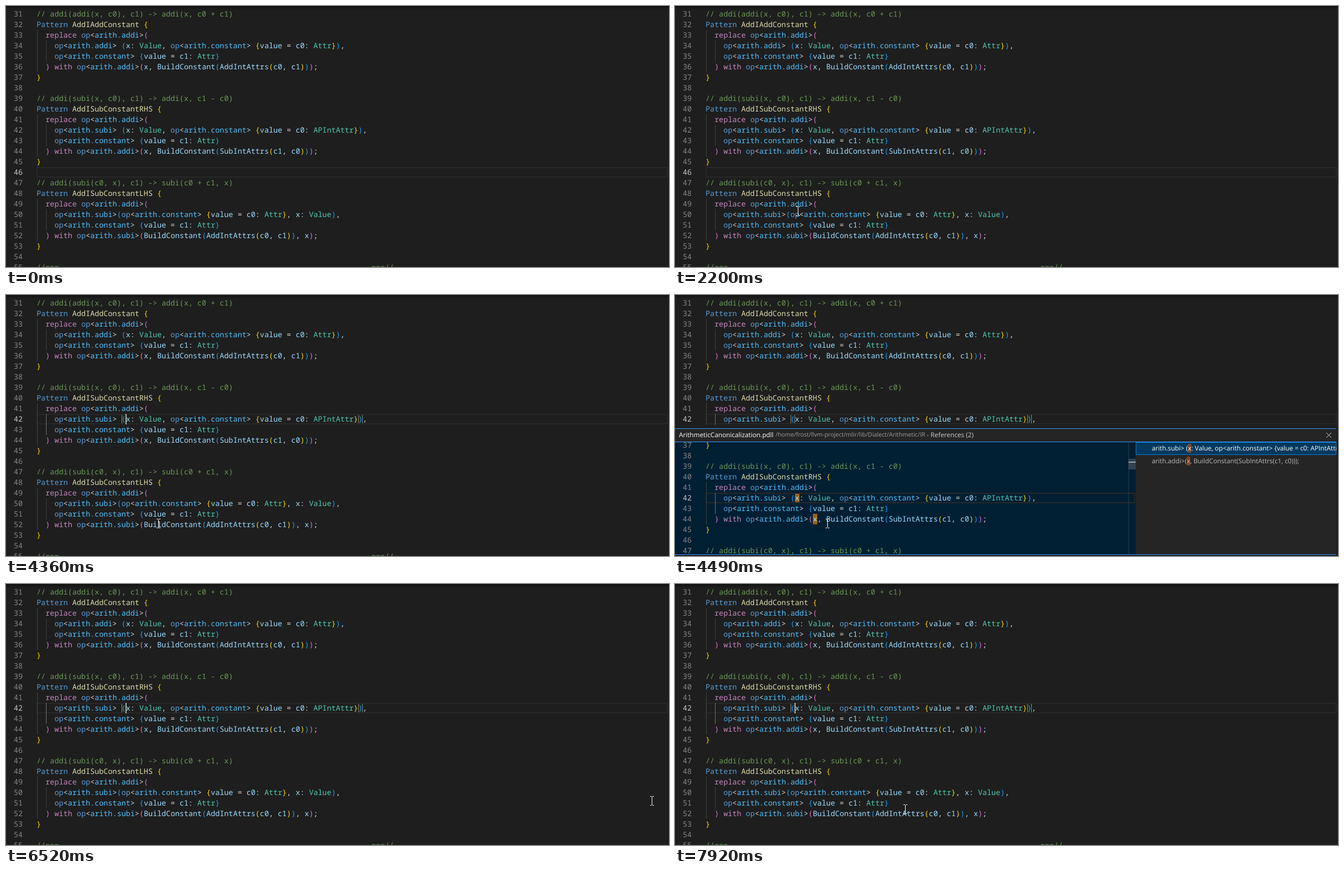
Animation of 1193 by 470 pixels, one loop 8000 ms. Source, as an HTML page:

```html
<!DOCTYPE html>
<html lang="en">
<head>
<meta charset="utf-8">
<title>Peek references</title>
<style>
html, body { margin: 0; width: 100%; height: 100%; overflow: hidden; background: #1e1e1e; }
body { position: relative; font: 11.75px "Open Sans", "Noto Sans", sans-serif; color: #ccc;
  text-rendering: geometricPrecision; white-space: pre; }
div, svg, i, b, u { position: absolute; box-sizing: border-box; }
.view { inset: 0; font: 13.4px/19px "Noto Sans Mono", monospace; font-variant-ligatures: none; color: #d4d4d4; }
.row { left: 0; right: 0; height: 19px; }
.row i { left: 0; width: 30px; text-align: right; font-style: normal; color: #858585; }
.row.on i { color: #c6c6c6; }
.row.on::before { content: ""; position: absolute; left: 55px; right: 2px; top: 0; bottom: 0;
  box-sizing: border-box; border: 2px solid #282828; }
.row u { width: 1px; height: 19px; background: #404040; }
.row u.on { background: #707070; }
.row p { position: absolute; margin: 0; left: 55px; }
.box { width: 8px; height: 19px; border: 1px solid #888; background: rgba(0, 100, 0, .1); }
.mark { width: 8px; height: 19px; background: #ff8f0099; }
#caret { left: 215px; top: 214px; width: 2px; height: 19px; background: #aeafad; }
#shade { left: 0; right: 0; top: 0; height: 6px; box-shadow: #000 0 6px 6px -6px inset; }

#tip { left: 216px; top: 152px; width: 106px; height: 62px; background: #252526; border: 1px solid #454545; line-height: 30px; }
#tip div { left: 8px; }
#tip b { position: static; }
#tip code { font: 11px "Noto Sans Mono", monospace; background: #0a0a0a66; padding: 1px 2px; border-radius: 3px; }
#hot { left: 216px; top: 214px; width: 8px; height: 19px; background: #264f7840; }

#menu { left: 218px; top: 225px; width: 279px; height: 260px; padding-top: 7px; background: #252526;
  box-shadow: 0 2px 5px rgba(0, 0, 0, .5); }
#menu div { position: relative; height: 24px; line-height: 24px; padding-left: 25px; }
#menu div.on { background: #04395e; color: #fff; }
#menu div span { position: absolute; right: 25px; }
#menu hr { margin: 0 11px 0 10px; height: 8px; box-sizing: border-box; border: 0;
  background: linear-gradient(#bbb, #bbb) 0 2px / 100% 1px no-repeat; }

#peek { left: 0; top: 234px; width: 1190px; height: 236px; background: #1e1e1e; }
#head { top: 6px; width: 1190px; height: 25px; background: #252526; border: solid #3794ff; border-width: 1px 0; line-height: 23px; }
#code { top: 31px; width: 829px; height: 202px; background: #001f33; overflow: hidden; }
#code .view { top: -123px; height: 470px; }
#code .row.on::before { right: 1px; }
#list { left: 829px; top: 31px; width: 361px; height: 202px; background: #252526; overflow: hidden; line-height: 22px; }
#list div { width: 361px; height: 23px; padding-left: 29px; color: #bbb; }
#list div.on { background: #04395e; border: 1px solid #007fd4; padding-left: 28px; color: #fff; line-height: 21px; }
#list span { background: #ea5c0080; }
#close { left: 1166px; top: 1px; width: 21px; height: 21px; border-radius: 5px; }
</style>
</head>
<body>
<div id="before" class="view"></div>
<div id="after" class="view"></div>
<div id="caret"></div>
<div id="shade"></div>
<div id="hot"></div>
<div id="tip"><div><b>Variable</b>: <code>x</code></div><div style="top:30px">Type: <code>Value</code></div></div>
<div id="menu"></div>
<div id="peek">
  <svg width="230" height="7"><path d="M208 7L215.500 0 223 7Z" fill="#3794ff"/></svg>
  <div id="head"><div style="left:7px;color:#fff">ArithmeticCanonicalization.pdll</div><div
    style="left:181px;font-size:10.7px;color:#9d9d9d">/home/frost/llvm-project/mlir/lib/Dialect/Arithmetic/IR</div><div
    style="left:453px">- References (2)</div><div id="close"><svg width="21" height="21"><path d="M6 6l9 9M15 6l-9 9" stroke="#ccc"/></svg></div></div>
  <div id="code"></div>
  <div id="list"><div class="on">arith.subi&gt; (<span>x</span>: Value, op&lt;arith.constant&gt; {value = c0: APIntAttr}),</div><div
    style="top:23px">arith.addi&gt;(<span>x</span>, BuildConstant(SubIntAttrs(c1, c0)));</div></div>
  <div style="top:233px;width:1190px;height:1px;background:#3794ff"></div>
</div>
<svg id="mouse" width="1193" height="470">
  <path d="M-3.500-8H-1L0-7 1-8H3.500M0-7V7M-3.500 8H-1L0 7 1 8H3.500" fill="none" stroke="#fff"/>
  <path d="M0 0V16L4 12.500 6.500 18.500 9 17.500 6.500 11.500H12Z" fill="#fff" stroke="#000" stroke-width=".8"/>
  <path d="M-2 1Q0-2 2 1V6Q4 5 5 7 7 6 7.500 8 9.500 7.500 9.500 10V15Q9 18 8 22H-1Q-2 17-5 14-6 11-4 11-3 11-2 13ZM2 6V11M5 7V11M7.500 8V11" fill="#fff" stroke="#000"/>
</svg>
<script>
const FIRST = 31, CHAR = 8.04, LOOP = 8000;
const $ = id => document.getElementById(id);
const lines = `// addi(addi(x, c0), c1) -> addi(x, c0 + c1)
Pattern AddIAddConstant {
  replace op<arith.addi>(
    op<arith.addi> (x: Value, op<arith.constant> {value = c0: Attr}),
    op<arith.constant> {value = c1: Attr}
  ) with op<arith.addi>(x, BuildConstant(AddIntAttrs(c0, c1)));
}

// addi(subi(x, c0), c1) -> addi(x, c1 - c0)
Pattern AddISubConstantRHS {
  replace op<arith.addi>(
    op<arith.subi> (x: Value, op<arith.constant> {value = c0: APIntAttr}),
    op<arith.constant> {value = c1: Attr}
  ) with op<arith.addi>(x, BuildConstant(SubIntAttrs(c1, c0)));
}

// addi(subi(c0, x), c1) -> subi(c0 + c1, x)
Pattern AddISubConstantLHS {
  replace op<arith.addi>(
    op<arith.subi>(op<arith.constant> {value = c0: Attr}, x: Value),
    op<arith.constant> {value = c1: Attr}
  ) with op<arith.subi>(BuildConstant(AddIntAttrs(c0, c1)), x);
}

//===${'-'.repeat(70)}===//`.split('\n');

const wordColors = [
  [/^\/\//, '#6a9955'], [/^(Pattern|op)$/, '#569cd6'], [/^(replace|with)$/, '#c586c0'],
  [/^arith\./, '#4fc1ff'], [/^AddI(Add|Sub)C/, '#dcdcaa'], [/^(Value|Attr|APIntAttr)$/, '#4ec9b0'], [/./, '#9cdcfe'],
];
const bracketColors = ['#ffd700', '#da70d6', '#179fff'];
const escapeHtml = s => s.replace(/</g, '&lt;');

// Editor rows with one current line; the block around it has a brighter guide.
function view(current) {
  let depth = 0;
  const paint = token => {
    let color;
    if (/[({]/.test(token)) color = bracketColors[depth++ % 3];
    else if (/[)}]/.test(token[0])) color = bracketColors[--depth % 3];
    else color = wordColors.find(([re]) => re.test(token))[1];
    return `<span style="color:${color}">${escapeHtml(token)}</span>`;
  };
  const paintLine = s => s.startsWith('//') ? `<span style="color:#6a9955">${s}</span>` :
    s.split(/([(){}]|[\w.]+)/).map((part, k) => k % 2 ? paint(part) : escapeHtml(part)).join('');
  return lines.map((s, k) => {
    const n = k + FIRST, indent = s.search(/\S|$/);
    let guides = '';
    for (let col = 0; col < indent; col += 2) {
      const on = col == 2 && current == 42 && (n == 42 || n == 43);
      guides += `<u class="${on ? 'on' : ''}" style="left:${56 + col * 8}px"></u>`;
    }
    return `<div class="row ${n == current ? 'on' : ''}" style="top:${5 + 19 * k}px"><i>${n}</i>${guides}<p>${paintLine(s)}</p></div>`;
  }).join('');
}
const cell = (kind, line, col) =>
  `<div class="${kind}" style="left:${55 + col * CHAR}px;top:${5 + 19 * (line - FIRST)}px"></div>`;

$('before').innerHTML = view(46);
$('after').innerHTML = cell('box', 42, 19) + cell('box', 42, 72) + view(42);
$('code').innerHTML = `<div class="view">${cell('mark', 42, 20)}${cell('mark', 44, 24)}${view(42)}</div>
  <div style="left:816px;top:0;width:1px;height:202px;background:#7f7f7f4d"></div>
  <div style="left:816px;top:30px;width:13px;height:19px;background:#79797966"></div>
  <div style="left:816px;top:35px;width:13px;height:2px;background:#a0a0a0"></div>`;
$('menu').innerHTML = ['Go to Definition|F12', 'Go to References|Shift+F12', 'Peek|', '',
  'Find All References|Shift+Alt+F12', '', 'Change All Occurrences|Ctrl+F2', '',
  'Cut|Ctrl+X', 'Copy|Ctrl+C', 'Paste|Ctrl+V', '', 'mlir-pdll: View PDLL output|'].map(item => {
    const [label, keys] = item.split('|');
    return item ? `<div>${label}<span>${keys}</span></div>` : '<hr>';
  }).join('');
const items = $('menu').querySelectorAll('div');
items[2].innerHTML += '<svg style="left:259px;top:6px" width="10" height="12"><path d="M2 1l5 5-5 5" fill="none" stroke="#ccc"/></svg>';

// Pointer path: time, x, y
const path = [
  [460, 1142, 466], [860, 767, 385], [1260, 511, 320], [1700, 297, 250], [2130, 222, 227], [2200, 221, 225],
  [3439, 221, 225], [3440, 219, 224], [3660, 219, 224], [3860, 244, 245], [4090, 274, 267],
  [5100, 274, 267], [5400, 560, 328], [5560, 850, 325], [5680, 1060, 296], [5760, 1115, 279],
  [5960, 1157, 253], [6260, 1174, 254], [6400, 1174, 254], [6450, 1172, 250], [6590, 1153, 242],
  [6900, 800, 272], [7250, 484, 307], [7500, 430, 292], [7920, 414, 261], [LOOP, 414, 261],
];
function pointerAt(t) {
  const k = Math.max(1, path.findIndex(p => p[0] > t));
  const [a, b] = [path[k - 1], path[k]];
  const u = Math.max(0, (t - a[0]) / (b[0] - a[0]));
  return [1, 2].map(j => Math.round(a[j] + (b[j] - a[j]) * u));
}
const show = (id, on) => { $(id).style.visibility = on ? 'visible' : 'hidden'; };

function draw(now) {
  const t = now % LOOP;
  const within = (a, b) => t >= a && t < b;
  const [x, y] = pointerAt(t);
  const menu = within(3440, 4230), peek = within(4420, 6450);

  show('before', t < 3370);
  show('after', t >= 3370);
  show('hot', within(2600, 3230));
  show('tip', within(2600, 3230));
  $('tip').style.opacity = Math.min(1, Math.max(0, (t - 2570) / 100));
  show('menu', menu);
  const picked = menu ? Math.floor((y - 232) / 24) : -1;
  items.forEach((item, k) => { item.className = k == picked ? 'on' : ''; });
  show('peek', peek);
  $('close').style.background = peek && x > 1166 ? 'rgba(90,93,94,.31)' : 'none';
  show('caret', within(4230, 4420) || t >= 6450 && (t - 6450) % 1000 < 500);

  show('mouse', t >= 460);
  const kind = within(3440, 4360) ? 1 : peek && x > 816 ? 2 : 0;
  [...$('mouse').children].forEach((shape, k) => {
    shape.style.display = k == kind ? '' : 'none';
    const half = k ? 0 : .5;
    shape.setAttribute('transform', `translate(${x + half} ${y + half})` + (k == 2 ? ' scale(.88)' : ''));
  });
  requestAnimationFrame(draw);
}
draw(0);
</script>
</body>
</html>
```
